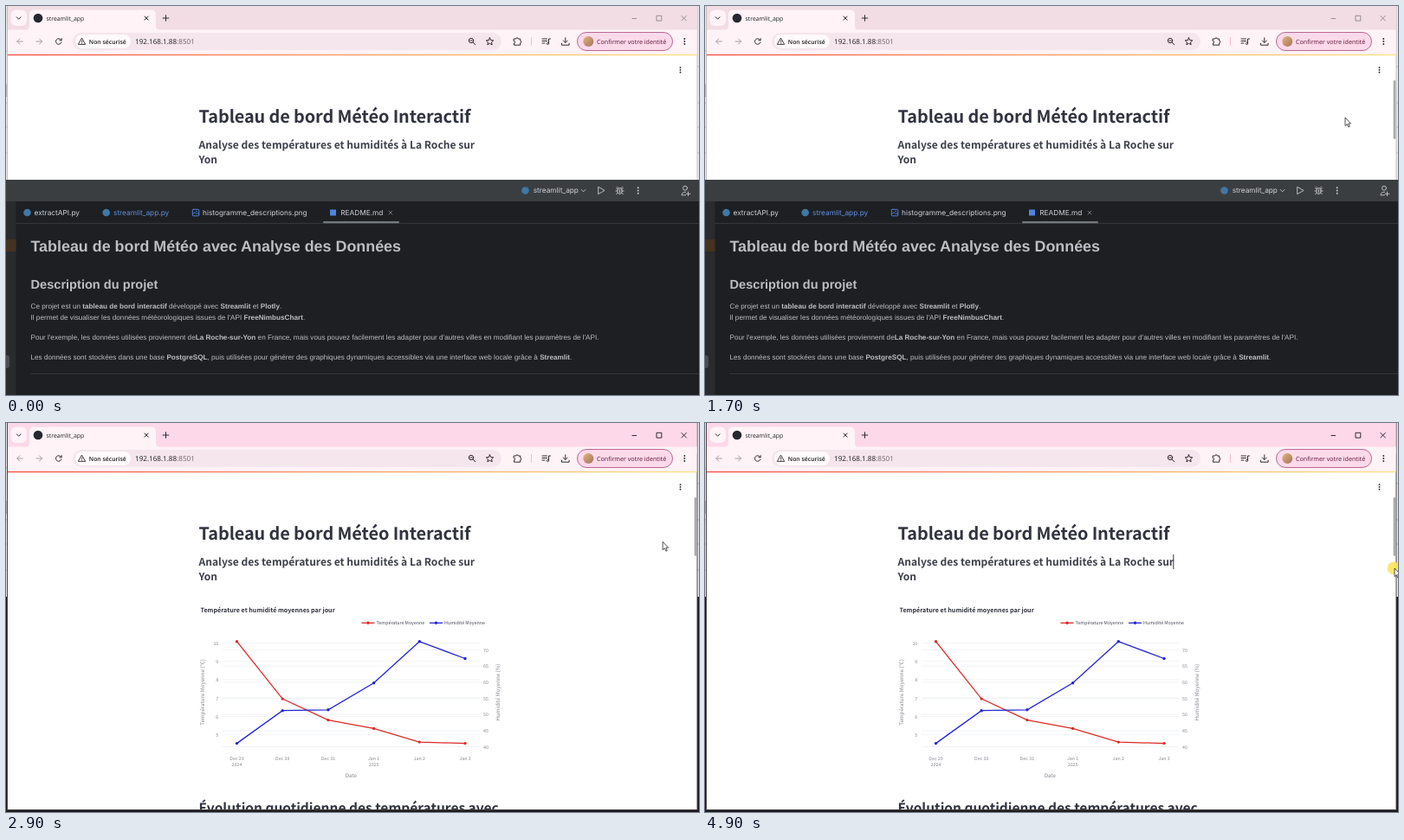
These frames come from a looping animation (800x450 px, 5 s). An HTML page:

```html
<!DOCTYPE html>
<html lang="fr">
<head>
<meta charset="utf-8">
<title>Tableau de bord</title>
<style>
html, body { margin: 0; width: 100%; height: 100%; overflow: hidden; background: #fff; }
svg { display: block; width: 800px; height: 450px; text-rendering: geometricPrecision; white-space: pre; }
#stage { --strip: #f2dde5; --frame: #c4bbc0; --ctl: #8d8388; --nav: #a79da2; }
#stage.active { --strip: #fcd8e8; --frame: #4c4147; --ctl: #1d1b1c; }
.ui { font-family: "Open Sans", "Noto Sans", sans-serif; fill: #1f1f1f; }
.page { font-family: "Noto Sans CJK JP", "Noto Sans CJK SC", "Open Sans", sans-serif; fill: #31333f; font-weight: 700; }
.sub { font-size: 12.07px; fill: #3e404b; }
.plot { font-weight: 400; font-size: 5.3px; fill: #84868f; }
.axis { font-size: 6.2px; text-anchor: middle; }
.legend { fill: #444753; }
.ide { font-family: Inter, Roboto, sans-serif; font-size: 8.3px; fill: #cfd1d6; }
.doc { font-family: "Liberation Sans", Arial, sans-serif; font-size: 8.16px; fill: #bcbec4; }
.b, .doc tspan { font-weight: 700; }
.line { fill: none; stroke: #33292d; stroke-width: 1; stroke-linecap: round; stroke-linejoin: round; }
</style>
</head>
<body>
<svg id="stage" viewBox="0 0 800 450">
  <!-- desktop behind the windows -->
  <rect width="800" height="450" fill="#e9eaec"/>
  <path d="M0 90h2v15h-2z" fill="#b9bbbf"/>
  <path d="M0 52h2M0 112h2M0 140h2M0 170h2M798 70h2M798 112h2M798 140h2M798 170h2" stroke="#b5b8bc"/>
  <rect y="201" width="800" height="249" fill="#1b1c1f"/>

  <!-- browser -->
  <rect x="1.5" y="-1" width="796.5" height="448.5" fill="#fff" stroke="var(--frame)"/>
  <rect x="2" width="795.5" height="36" fill="var(--strip)"/>
  <rect x="2" y="27.5" width="795.5" height="28.5" fill="#fff3f7"/>
  <path d="M22 28q5 0 5-5V10q0-5.500 5.500-5.500h135q5.500 0 5.500 5.500v13q0 5 5 5z" fill="#fff3f7"/>
  <rect x="5.500" y="4.500" width="18.500" height="18.500" rx="6" fill="#fff3f7"/>
  <circle cx="37" cy="14" r="5.300" fill="#262730"/>
  <g class="line">
    <path d="M12.300 12.800l2.400 2.400 2.400-2.400M160 12l4.200 4.200M164.200 12l-4.200 4.200M181.200 14h6.600M184.500 10.700v6.600"/>
    <g style="stroke:var(--ctl)" stroke-linecap="butt">
      <path d="M722.500 14.500h5.500M751 11.300h5.800v5.800h-5.800zM779.600 11.200l6 6M785.600 11.200l-6 6" stroke-width=".9"/>
    </g>
    <path d="M19.300 41h-6.400M15.800 37.900L12.700 41l3.100 3.100M35 41h6.400M38.500 37.900l3.100 3.100-3.100 3.100" style="stroke:var(--nav)"/>
    <path d="M63.600 39.200a3.300 3.300 0 1 0 .4 2.800M64.200 37.600v2.200h-2.300"/>
  </g>
  <rect x="77" y="31" width="495" height="20" rx="10" fill="#f5e5ec"/>
  <rect x="80" y="33" width="64" height="16" rx="8" fill="#fffafc"/>
  <g class="line">
    <path d="M87.700 37.400l4 7h-8zM87.700 40v2M87.700 43.200v.1" stroke-width=".9"/>
    <circle cx="537" cy="40" r="2.700"/><path d="M539.100 42.100l2.700 2.700M535.900 40h2.200"/>
    <path d="M558.500 36.800l1.250 2.750 3 .3-2.250 2 .65 2.950-2.650-1.550-2.650 1.550.65-2.950-2.250-2 3-.3z"/>
    <path d="M586.500 38h2.300a1.200 1.200 0 0 1 2.400 0h2.500v2.300a1.200 1.200 0 0 1 0 2.400v2.500h-7.200v-2.300a1.200 1.200 0 0 0 0-2.400z"/>
    <path d="M606.500 36.500v9" stroke="#f3bfd2"/>
    <path d="M619 38h5.500M619 40.500h5.500M619 43h3M626.500 43.500v-5.500h2"/><circle cx="625.500" cy="43.500" r="1.100"/>
    <path d="M645.800 36.800v5.300M643.300 40l2.500 2.500 2.500-2.500M641.500 43.200v2h8.600v-2"/>
  </g>
  <rect x="659.500" y="30.500" width="110" height="21" rx="10.500" fill="#fddaea" stroke="#b4598a" stroke-width=".9"/>
  <circle cx="672.300" cy="41" r="6" fill="url(#avatar)"/>
  <g class="ui">
    <text x="46.500" y="16.800" font-size="6.900">streamlit_app</text>
    <text x="95.800" y="43.500" font-size="6.860" font-weight="600">Non sécurisé</text>
    <text x="149" y="44" font-size="8.100">192.168.1.88<tspan fill="#6d6267">:8501</tspan></text>
    <text x="682" y="43.600" font-size="7.150" fill="#5b1435">Confirmer votre identité</text>
  </g>
  <g id="dots"></g>

  <!-- dashboard page -->
  <rect x="2" y="55.800" width="795.500" height="1.500" fill="url(#deco)"/>
  <svg x="0" y="57" width="797" height="390" viewBox="0 57 797 390" class="page">
    <text x="222.500" y="135" font-size="19.880" letter-spacing="-.1">Tableau de bord Météo Interactif</text>
    <text x="222.500" y="165" class="sub">Analyse des températures et humidités à La Roche sur</text>
    <text x="222.500" y="182" class="sub">Yon</text>
    <text x="224.500" y="219" font-size="7.170">Température et humidité moyennes par jour</text>
    <text x="222.500" y="451" font-size="15.500">Évolution quotidienne des températures avec</text>
    <g id="plot" class="plot"></g>
  </svg>
  <rect id="bar" x="794.600" y="86" width="2.800" height="68" rx="1.400" fill="#a9abb2"/>
  <rect id="caret" width="1" fill="#31333f"/>

  <!-- editor window -->
  <g id="ide">
    <rect y="201" width="800" height="249" fill="#1e1f22"/>
    <rect y="201" width="800" height="25" fill="#3b3e41"/>
    <rect y="226" width="11.500" height="224" fill="#292b2e"/>
    <rect y="270" width="11.500" height="14" fill="#45321f"/>
    <rect x="-4" y="404" width="8" height="15" rx="3" fill="#4b4d52"/>
    <path d="M11.500 251.500H800M28.500 425.500H800" stroke="#34363a"/>
    <rect x="366" y="249" width="88" height="2.200" rx="1" fill="#73777e"/>
    <g fill="#3f78a6">
      <circle cx="599.500" cy="213.500" r="4.300"/><circle cx="24.500" cy="239" r="4.300"/><circle cx="115.700" cy="239" r="4.300"/>
    </g>
    <rect x="374" y="235.500" width="7" height="7" fill="#4f83e0"/>
    <g class="line" style="stroke:#4c82e0">
      <rect x="215.300" y="235.300" width="7.500" height="7.500" rx="1"/><path d="M215.500 241l2.500-2.500 2 2 1-1 1.700 1.600"/><path d="M219.800 237.500h.6"/>
    </g>
    <g class="line" style="stroke:#c9cbd0;stroke-width:.9">
      <path d="M664.300 212.500l2.300 2.300 2.300-2.300M683.700 209.600v8l7-4z"/>
      <ellipse cx="708.500" cy="214" rx="2.600" ry="3.600"/>
      <path d="M706.500 210.300l-1-1.200M710.500 210.300l1-1.200M705.900 214h-2M711.100 214h2M706.200 216.200l-1.600 1.300M710.800 216.200l1.600 1.300M706.200 212l-1.600-1.200M710.800 212l1.600-1.200M708.500 212v4"/>
      <circle cx="784" cy="210.700" r="2.500"/><path d="M784.500 215.200c-3 0-4.500 1.300-4.500 3.600h4.500M787.500 215v4.600M785.200 217.300h4.600"/>
      <path d="M442 237.200l3.800 3.800M445.800 237.200l-3.800 3.800" style="stroke:#80838a"/>
    </g>
    <g class="ide">
      <text x="608.700" y="216.300">streamlit_app</text>
      <text x="32.500" y="242.300">extractAPI.py</text>
      <text x="124" y="242.300" fill="#5f8fdf">streamlit_app.py</text>
      <text x="227" y="242.300">histogramme_descriptions.png</text>
      <text x="386.200" y="242.300">README.md</text>
    </g>
    <g class="doc">
      <text class="b" x="28.500" y="284" style="font-size:17.9px">Tableau de bord Météo avec Analyse des Données</text>
      <text class="b" x="28.500" y="327.300" style="font-size:14.6px">Description du projet</text>
      <text x="28.500" y="349.600">Ce projet est un <tspan>tableau de bord interactif</tspan> développé avec <tspan>Streamlit</tspan> et <tspan>Plotly</tspan>.</text>
      <text x="28.500" y="362.600">Il permet de visualiser les données météorologiques issues de l'API <tspan>FreeNimbusChart</tspan>.</text>
      <text x="28.500" y="385.800">Pour l'exemple, les données utilisées proviennent de<tspan>La Roche-sur-Yon</tspan> en France, mais vous pouvez facilement les adapter pour d'autres villes en modifiant les paramètres de l'API.</text>
      <text x="28.500" y="408.900">Les données sont stockées dans une base <tspan>PostgreSQL</tspan>, puis utilisées pour générer des graphiques dynamiques accessibles via une interface web locale grâce à <tspan>Streamlit</tspan>.</text>
    </g>
    <g id="ideDots"></g>
  </g>

  <circle id="halo" r="7.300" fill="#fbe65c" opacity=".92"/>
  <path id="mouse" d="M0 0V9.600L2.200 7.600 3.800 11 5.200 10.400 3.700 7H6.500Z" fill="#fff" stroke="#26262a" stroke-width=".8" stroke-linejoin="round"/>

  <defs>
    <linearGradient id="deco"><stop stop-color="#f45a50"/><stop offset="1" stop-color="#fbe58a"/></linearGradient>
    <linearGradient id="avatar" x2="1" y2="1"><stop stop-color="#dcb87c"/><stop offset="1" stop-color="#a8705f"/></linearGradient>
  </defs>
</svg>
<script>
const $ = id => document.getElementById(id);
const put = (id, html) => $(id).insertAdjacentHTML('beforeend', html);

// three-dot menus
const dots = (x, y, gap, color) => [-gap, 0, gap]
  .map(d => `<circle cx="${x}" cy="${y + d}" r=".95" fill="${color}"/>`).join('');
put('dots', dots(783.3, 41, 3, '#33292d') + dots(778.5, 74, 2.7, '#31333f'));
put('ideDots', dots(729.7, 213.5, 3.2, '#ced0d6'));

// chart
const label = (x, y, text, extra = '') => `<text x="${x}" y="${y}" ${extra}>${text}</text>`;
const grid = y => `<path d="M250 ${y}H547" stroke="#e8ebf1" stroke-width=".6"/>`;
const dayX = i => 266.5 + i * 52.7;
let chart = '';
for (let v = 5; v <= 10; v++) {
  const y = 254.4 + (10 - v) * 21.25;
  chart += grid(y) + label(245.3, y + 2.4, v, 'text-anchor="end"');
}
for (let v = 40; v <= 70; v += 5) {
  const y = 374.5 - (v - 40) * 3.73;
  chart += grid(y) + label(551, y + 2.2, v);
}
['Dec 29', 'Dec 30', 'Dec 31', 'Jan 1', 'Jan 2', 'Jan 3'].forEach((day, i) =>
  chart += label(dayX(i), 389.6, day, 'text-anchor="middle"'));
chart += label(dayX(0), 397, 2024, 'text-anchor="middle"') + label(dayX(3), 397, 2025, 'text-anchor="middle"');

const series = (pts, color) =>
  `<polyline points="${pts.join(' ')}" fill="none" stroke="${color}" stroke-width="1.3"/>` +
  pts.map(([x, y]) => `<circle cx="${x}" cy="${y}" r="1.7" fill="${color}"/>`).join('');
const curve = (ys, color) => series(ys.map((y, i) => [dayX(i), y]), color);
const key = (x, text, color) =>
  series([[x, 231.3]], color) +
  `<path d="M${x - 7.5} 231.300h15" stroke="${color}" stroke-width="1.3"/>` +
  label(x + 9.6, 233.4, text, 'class="legend"');
const RED = '#dc2a26', BLUE = '#2424d6';
chart += curve([252.7, 319.1, 343.6, 353.4, 369.1, 370.6], RED);
chart += curve([370.6, 332.7, 331.8, 300.7, 252.8, 272.5], BLUE);
chart += key(418, 'Température Moyenne', RED) + key(496.5, 'Humidité Moyenne', BLUE);
chart += label(398.3, 410, 'Date', 'class="axis"');
const side = (x, text) => label(0, 0, text, `class="axis" transform="translate(${x} 311.500) rotate(-90)"`);
chart += side(229.3, 'Température Moyenne (°C)') + side(570, 'Humidité Moyenne (%)');
put('plot', chart);

// pointer path: time, x, y
const LOOP = 5000, FOCUS = 2300, PRESS = 3400, BLINK = 530;
const path = [
  [0, 688, 452], [150, 688, 452], [600, 705, 268], [800, 708, 262], [1250, 739, 129],
  [1700, 739, 129], [2100, 739, 133], [2600, 739, 133], [3350, 793, 145],
  [3500, 793.5, 146], [4900, 796, 168], [5000, 796, 168]
];
const smooth = p => p * p * (3 - 2 * p);

function pointer(t) {
  const i = path.findIndex(k => k[0] > t);
  const [t0, x0, y0] = path[i - 1], [t1, x1, y1] = path[i];
  const p = smooth((t - t0) / (t1 - t0));
  return [x0 + (x1 - x0) * p, y0 + (y1 - y0) * p];
}

const show = (id, on) => $(id).style.display = on ? '' : 'none';

function draw() {
  const t = performance.now() % LOOP;
  const [x, y] = pointer(t);
  const active = t >= FOCUS, pressed = t >= PRESS;
  $('stage').classList.toggle('active', active);
  show('ide', !active);
  show('bar', active || (t > 600 && y < 201));
  show('halo', pressed);
  $('mouse').setAttribute('transform', `translate(${x} ${y})`);
  $('halo').setAttribute('transform', `translate(${x - 1} ${y})`);

  const since = t - (pressed ? PRESS : FOCUS);
  show('caret', active && since % (2 * BLINK) < BLINK);
  const [cx, cy, h] = pressed ? [540.3, 152, 17] : [536, 113, 28];
  $('caret').setAttribute('x', cx);
  $('caret').setAttribute('y', cy);
  $('caret').setAttribute('height', h);
  requestAnimationFrame(draw);
}
draw();
</script>
</body>
</html>
```
